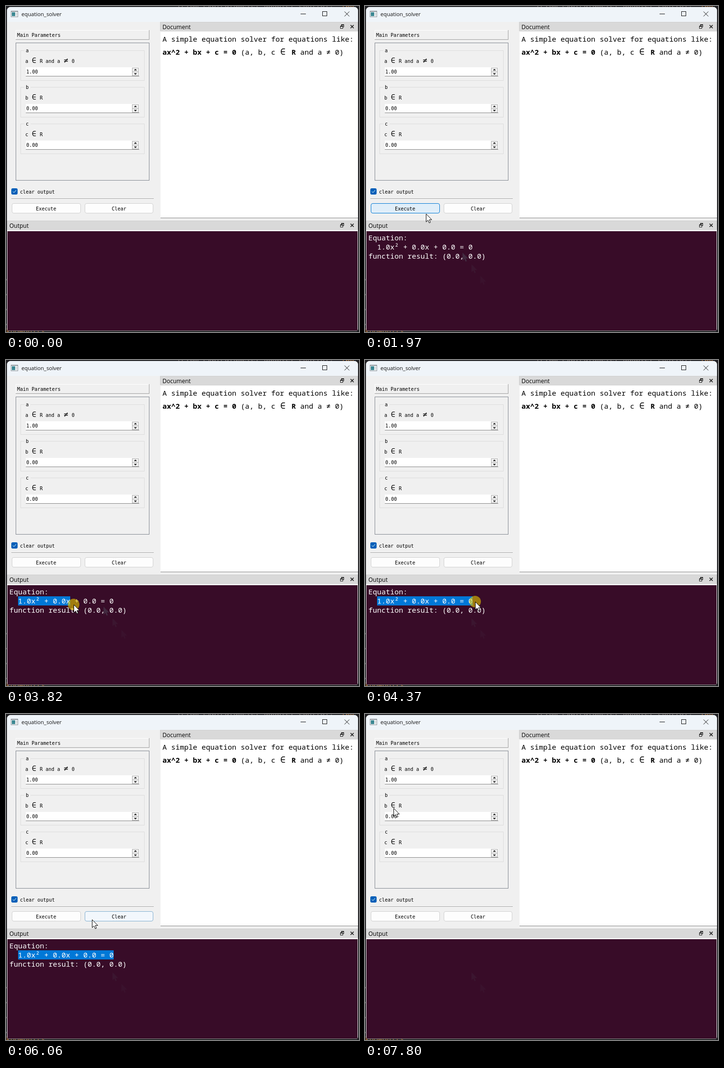
Recreate the animation shown at these times as an HTML page with a canvas. Size 731x676 px, loop 8000 ms.

```html
<!DOCTYPE html>
<html lang="en">
<head>
<meta charset="utf-8">
<title>equation_solver</title>
<style>
html, body { margin: 0; width: 100%; height: 100%; overflow: hidden; background: #1f1f1f; }
canvas { display: block; }
</style>
</head>
<body>
<canvas id="stage" width="731" height="676"></canvas>
<script>
const c = document.getElementById('stage').getContext('2d');
const LOOP = 8000;
const UI = '"Open Sans", sans-serif';
const MONO = '15px "Noto Sans Mono", monospace';
const SMALL = '"DejaVu Sans Mono", monospace';
const EQUATION = '1.0x² + 0.0x + 0.0 = 0';
const CELL = 9;

// when the mouse button goes down and up
const run = { down: 1310, up: 1440 };
const drag = { down: 3480, up: 4830 };
const wipe = { down: 6270, up: 6410 };

// pointer moves: start, end, x, y; it rests in between
const moves = [
  [70, 820, 93, 419], [1700, 2170, 147, 438], [2170, 2790, 22, 495],
  [2860, 2930, 15, 495], [3140, 3330, 22, 500], [3550, 3820, 140, 507],
  [3890, 4370, 228, 501], [4830, 5570, 107, 427], [5640, 6060, 178, 426],
  [6130, 6250, 186, 417], [6430, 7340, 72, 131], [7340, 7800, 59, 195]
];

const clamp = (v, a = 0, b = 1) => Math.min(b, Math.max(a, v));
const ramp = (t, a, b) => clamp((t - a) / (b - a));
const ease = k => k * k * (3 - 2 * k);
const within = (t, a, b) => t >= a && t < b;
const mix = (a, b, k) => `rgb(${a.map((v, i) => Math.round(v + (b[i] - v) * k))})`;

function pointer(t) {
  let x = 300, y = 650;
  for (const [from, to, x1, y1] of moves) {
    const k = ease(ramp(t, from, to));
    x += (x1 - x) * k;
    y += (y1 - y) * k;
  }
  return [x, y];
}

function rect(x, y, w, h, color) {
  c.fillStyle = color;
  c.fillRect(x, y, w, h);
}

function frame(x, y, w, h, color) {
  c.strokeStyle = color;
  c.lineWidth = 1;
  c.strokeRect(x + .5, y + .5, w - 1, h - 1);
}

function line(points, color, width = 1) {
  c.beginPath();
  points.forEach(p => c.lineTo(...p));
  c.strokeStyle = color;
  c.lineWidth = width;
  c.stroke();
}

function poly(points, color) {
  c.beginPath();
  points.forEach(p => c.lineTo(...p));
  c.closePath();
  c.fillStyle = color;
  c.fill();
}

function rounded(x, y, w, h, r, color) {
  c.beginPath();
  c.roundRect(x, y, w, h, r);
  c.fillStyle = color;
  c.fill();
}

function text(s, x, y, font, color = '#000') {
  c.font = font;
  c.fillStyle = color;
  c.fillText(s, x, y);
}

// fixed cell text: 6 px letters, 12 px symbols
function label(s, x, y) {
  for (const ch of s) {
    const wide = '∈≠'.includes(ch);
    text(ch, x + (wide ? 1.5 : 0), y, (wide ? 15 : 10) + 'px ' + SMALL);
    x += wide ? 12 : 6;
  }
}

function cross(x, y, size, color, width) {
  line([[x, y], [x + size, y + size]], color, width);
  line([[x + size, y], [x, y + size]], color, width);
}

function arrow(x, y, fill, edge) {
  const shape = [[0, 0], [0, 16.5], [3.8, 13], [6.3, 18.6], [8.9, 17.5], [6.5, 12], [11.6, 12]];
  poly(shape.map(([a, b]) => [x + a + .5, y + b + .5]), fill);
  if (edge) {
    c.strokeStyle = edge;
    c.lineWidth = 1;
    c.stroke();
  }
}

// slivers of the editor behind the window
function behind(active) {
  const warm = active ? '#a8703c' : '#a84444';
  rect(0, 0, 731, 676, '#1f1f22');
  text('(From ExprParameter adapter control, ', 354, 3, MONO, '#77706c');
  text('TWO', 694, 3, MONO, warm);
  text('knowunits', 0, 679, MONO, warm);
  for (let y = 566; y < 660; y += 31) rect(0, y, 1, 3, '#777');
}

function titleBar(active) {
  const ink = active ? '#111' : '#8c8c8c';
  rect(2, 2, 727, 31, active ? '#eff4f9' : '#f3f3f3');
  rect(10, 10, 15, 13, '#8a9299');
  rect(11, 12, 13, 10, '#fff');
  rect(12, 13, 7, 8, '#3b8792');
  rect(20, 13, 3, 8, '#d4dade');
  text('equation_solver', 32, 21, '11.2px ' + UI, ink);
  rect(610, 16, 11, 1, ink);
  frame(655, 11, 10, 10, ink);
  cross(701, 11.5, 10, ink, 1);
}

function dockTitle(name, x, y, w) {
  rect(x, y, w, 19, '#d9d9d9');
  frame(x, y, w, 19, '#cfcfcf');
  text(name, x + 5, y + 15, '12px ' + UI);
  for (const [bx, by] of [[694, y + 5], [692, y + 8]]) {
    rect(bx, by, 6, 6, '#222');
    rect(bx + 1, by + 2, 4, 3, '#d9d9d9');
  }
  cross(713.5, y + 6.5, 6.5, '#222', 1.7);
}

function field(name, hint, value, y) {
  frame(30, y, 257, 63, '#dcdcdc');
  rect(38, y - 2, 13, 5, '#f0f0f0');
  label(name, 41, y + 4);
  label(hint, 40, y + 26);
  rect(41, y + 35, 235, 18, '#fff');
  rect(41, y + 53, 235, 1, '#868686');
  label(value, 42, y + 48);
  for (const dir of [-1, 1]) {
    const m = y + 44.5 + dir * 4;
    rect(261, m - 4.5, 14, 9, '#f0f0f0');
    frame(261, m - 4.5, 14, 9, '#adadad');
    poly([[265, m - dir], [271, m - dir], [268, m + dir * 2]], '#000');
  }
}

function button(name, x, w, hover) {
  rounded(x + .5, 409.5, w - 1, 20, 3.5, mix([253, 253, 253], [224, 238, 249], hover));
  c.strokeStyle = mix([208, 208, 208], [0, 120, 212], hover);
  c.lineWidth = 1;
  c.stroke();
  label(name, Math.floor(x + w / 2 - name.length * 3), 424);
}

function parameters(t) {
  rect(20, 50, 277, 20, '#a0a0a0');
  rect(20, 50, 276, 19, '#fff');
  rect(21, 51, 275, 18, '#f0f0f0');
  label('Main Parameters', 23, 64);
  frame(20, 76, 277, 286, '#828790');
  [...'abc'].forEach((name, i) => {
    field(name, name + ' ∈ R' + (i ? '' : ' and a ≠ 0'), i ? '0.00' : '1.00', 92 + 76 * i);
  });
  rounded(11, 378, 13, 13, 3, '#005fb8');
  line([[14, 384.5], [16.5, 387], [21, 382]], '#fff');
  label('clear output', 29, 389);
  rect(11, 399, 295, 1, '#a0a0a0');
  rect(11, 400, 295, 1, '#fff');
  button('Execute', 12, 143, ramp(t, 820, 1050) - ramp(t, 2110, 2230));
  button('Clear', 163, 142, ramp(t, 5960, 6230) - ramp(t, 6480, 6650));
}

function documentPanel() {
  dockTitle('Document', 319, 33, 410);
  rect(320, 54, 409, 386, '#868686');
  rect(320, 54, 409, 385, '#fff');
  const put = (s, col, y, font = MONO) => text(s, 324 + col * CELL, y, font);
  const bold = 'bold ' + MONO;
  put('A simple equation solver for equations like:', 0, 74);
  put('ax^2 + bx + c = 0', 0, 101, bold);
  put('(a, b, c', 18, 101);
  put('∈', 27.1, 101, '18px ' + SMALL);
  put('R', 29.7, 101, bold);
  put('and a ≠ 0)', 31.7, 101);
}

// faint pointer prints, erased where the text is repainted
function prints(t) {
  for (let i = 0; i < 4; i++) {
    const end = [run.up, 4170][i] || LOOP;
    const alpha = .26 / (1 + 2 * Math.abs(i - 1));
    if (within(t, 540 - 70 * i, end)) {
      arrow(183 + 18.5 * i, 487 + 24 * i, `rgba(95,130,130,${alpha})`);
    }
  }
}

function output(t, x) {
  dockTitle('Output', 2, 445, 727);
  rect(2, 465, 727, 209, '#f4f4f4');
  rect(3, 467, 725, 206, '#380c28');
  rect(2, 673, 727, 1, '#8a8a8a');
  prints(t);
  if (!within(t, run.up, wipe.up)) return;
  if (t >= drag.down) {
    const end = t < 4370 ? x : Infinity;
    const count = clamp(Math.floor((end - 25) / CELL), 0, EQUATION.length);
    rect(25, 490, count * CELL, 19, '#0078d7');
  }
  text('Equation:', 7, 486, MONO, '#fff');
  text(EQUATION, 25, 505, MONO, '#fff');
  text('function result: (0.0, 0.0)', 7, 524, MONO, '#fff');
}

function draw(t) {
  const active = !within(t, 70, run.down);
  const [x, y] = pointer(t);
  behind(active);
  c.save();
  rounded(2, 2, 727, 672, [8, 8, 5, 5], '#f0f0f0');
  c.clip();
  titleBar(active);
  parameters(t);
  documentPanel();
  output(t, x);
  c.restore();

  if ([run, drag, wipe].some(p => within(t, p.down, p.up))) {
    c.beginPath();
    c.arc(x, y, 12, 0, 7);
    c.fillStyle = 'rgba(230,200,0,.6)';
    c.fill();
  }
  if (t >= 70) arrow(x, y, '#fff', '#000');
}

const start = performance.now();
function tick() {
  draw((performance.now() - start) % LOOP);
  requestAnimationFrame(tick);
}
tick();
</script>
</body>
</html>
```
